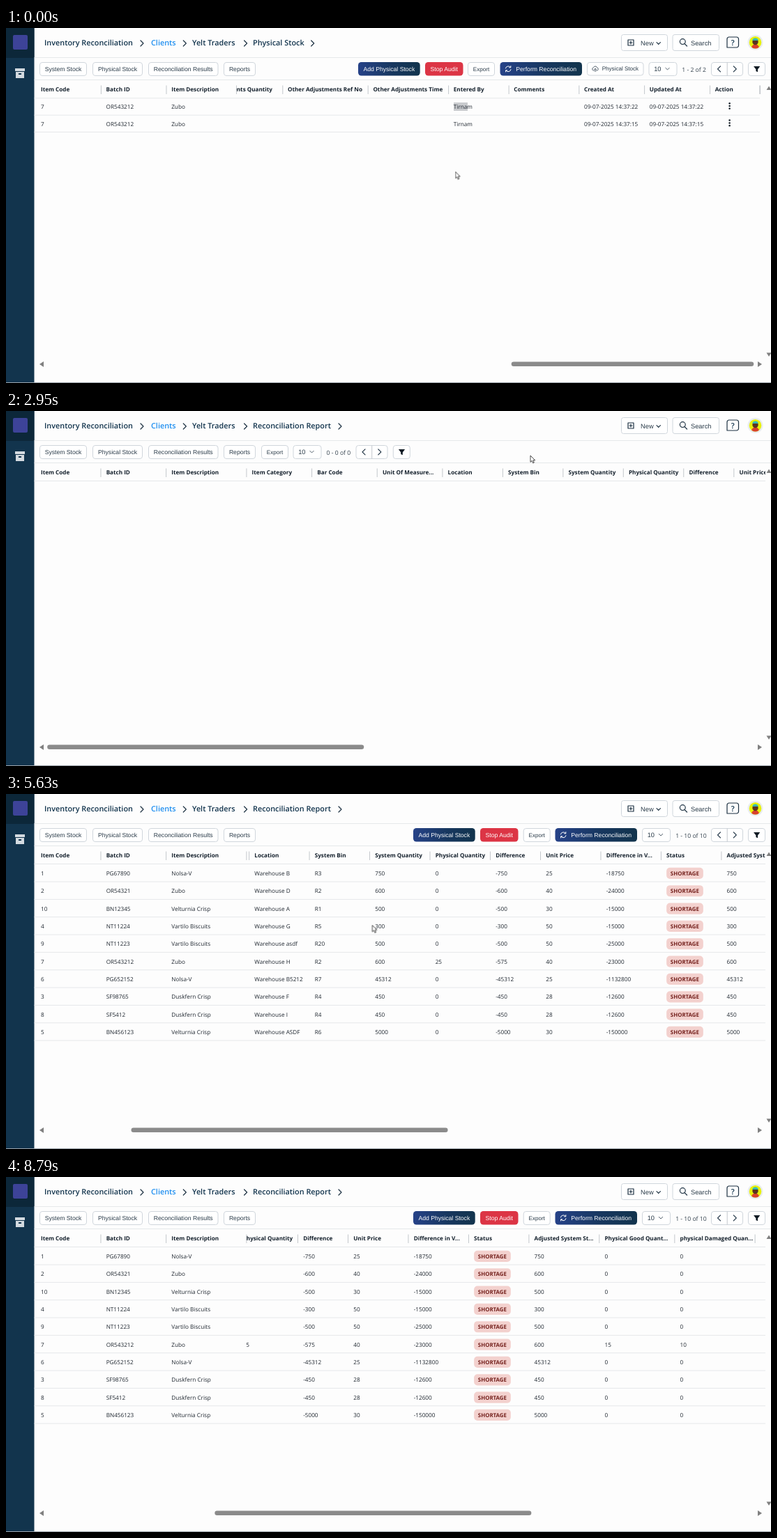
An HTML page that plays this animation: 1097 px wide and 510 px high, repeating every 8950 ms.

```html
<!DOCTYPE html>
<html lang="en">
<head>
<meta charset="utf-8">
<title>Inventory Reconciliation</title>
<style>
@property --s { syntax: "<number>"; inherits: true; initial-value: 0; }
html, body { margin: 0; width: 100%; height: 100%; overflow: hidden; background: #fdfdfd; }
svg { display: block; width: 1097px; height: 510px; }
text { font: 8.2px "Open Sans", "Noto Sans", sans-serif; fill: #1f2730; text-rendering: geometricPrecision; white-space: pre; }
.head { font-size: 8.15px; font-weight: 700; fill: #14202c; }
.crumb { font-size: 10.85px; font-weight: 600; fill: #12344d; }
.link { fill: #1f8ff0; }
.btn { font: 8.64px "Liberation Sans", Arial, sans-serif; fill: #2a3b49; }
.small { font-size: 8.07px; }
.large { font-size: 9.3px; }
.white { fill: #fff; }
.count { font-size: 8.6px; fill: #33414d; }
.badge { font-size: 7.85px; font-weight: 700; fill: #74201c; }
.mid { text-anchor: middle; }
.end { text-anchor: end; }
.box { fill: #fff; stroke: #d0d6dc; }
.navy { fill: url(#navy); }
.red { fill: #dc3545; }
.pill { fill: #f3d1ce; }
.line { fill: #e6e8ea; }
.sep { fill: #c4c8cc; }
.bar { fill: #8b8b8b; }
.ico { fill: none; stroke: #1d3142; stroke-width: 1.2; stroke-linecap: round; stroke-linejoin: round; }
.thin { stroke: #55626e; stroke-width: 1; }
.pale { stroke: #fff; stroke-width: 1; }

.stock, .blankless, .waiting, .loaded, .report, .lift, .sel, .seltext, .load, .cursor, .view {
  animation: 8950ms infinite step-end;
}
.stock { animation-name: stock; }
.report { animation-name: report; }
.blankless { animation-name: crumbs; }
.waiting { animation-name: waiting; }
.loaded { animation-name: loaded; }
.sel { fill: #c9cbce; animation-name: sel; }
.seltext { animation-name: seltext; }
.lift { animation-name: lift; animation-timing-function: ease; }
.load { fill: #12304a; animation-name: load; animation-timing-function: ease; }
.cursor { animation-name: move; animation-timing-function: ease-in-out; }
.view { animation-name: scroll; }
.slide { transform: translateX(calc(var(--s) * -1px)); }
.thumb { transform: translateX(calc(var(--s) * .434px)); }

@keyframes stock { 0% { visibility: visible } 28.827%, 100% { visibility: hidden } }
@keyframes crumbs { 0% { visibility: hidden } 28.827%, 100% { visibility: visible } }
@keyframes report { 0% { visibility: hidden } 31.955%, 100% { visibility: visible } }
@keyframes waiting { 0% { visibility: hidden } 31.955% { visibility: visible } 35.866%, 100% { visibility: hidden } }
@keyframes loaded { 0% { visibility: hidden } 35.866%, 100% { visibility: visible } }
@keyframes sel { 0% { fill: #c9cbce } 16.648%, 100% { fill: #2c66cc } }
@keyframes seltext { 0% { fill: #1f2730 } 16.648%, 100% { fill: #fff } }
@keyframes lift {
  0%, 12.8% { transform: none; filter: drop-shadow(0 0 0 rgba(40,62,140,0)) }
  14.749%, 100% { transform: translateY(-.8px); filter: drop-shadow(0 3px 3.5px rgba(40,62,140,.55)) }
}
@keyframes load {
  0%, 18.771% { transform: scaleX(0); opacity: 1 }
  21.006%, 22.01% { transform: scaleX(.0875) }
  24% { transform: scaleX(.18) }
  25.9% { transform: scaleX(.3) }
  28.268% { transform: scaleX(1) }
  28.827% { transform: scaleX(1); opacity: 1 }
  29.944%, 100% { transform: scaleX(1); opacity: 0 }
}
@keyframes move {
  0%, 4.693% { transform: translate(644.5px, 206.5px) }
  14.413%, 34.86% { transform: translate(752px, 64px) }
  44.469%, 45.81% { transform: translate(628px, 86px) }
  51.061%, 52.849% { transform: translate(203px, 121px) }
  55.084%, 70.056% { transform: translate(525.3px, 188.5px) }
  77.318%, 78.659% { transform: translate(273px, 250px) }
  81.788%, 85.251% { transform: translate(716px, 341px) }
  92.291%, 100% { transform: translate(1059px, 512px) }
}
@keyframes scroll {
  0% { --s: 0 }
  58.101% { --s: 57.3 }
  58.436% { --s: 74 }
  59.5% { --s: 118 }
  60.6% { --s: 170 }
  61.8% { --s: 226 }
  62.905% { --s: 277.3 }
  63.799% { --s: 336 }
  64.7% { --s: 396 }
  65.6% { --s: 450 }
  66.5% { --s: 495 }
  67.374% { --s: 526 }
  68.156% { --s: 543 }
  69.162% { --s: 551 }
  71.5% { --s: 552.4 }
  74%, 100% { --s: 553.3 }
}
</style>
</head>
<body>
<svg id="stage" viewBox="0 0 1097 510" xmlns="http://www.w3.org/2000/svg"></svg>
<script>
const text = (x, y, s, cls = '') => `<text x="${x}" y="${y}" class="${cls}">${s}</text>`;
const rect = (x, y, w, h, cls, rx = 0) => `<rect x="${x}" y="${y}" width="${w}" height="${h}" rx="${rx}" class="${cls}"/>`;
const path = (d, cls = 'ico', x = 0, y = 0) => `<path d="${d}" class="${cls}" transform="translate(${x} ${y})"/>`;
const group = (cls, ...parts) => `<g class="${cls}">${parts.join('')}</g>`;
const clip = (id, ...parts) => `<g clip-path="url(#${id})">${parts.join('')}</g>`;

const right = 'M-2 -4L2 0L-2 4', left = 'M2 -4L-2 0L2 4', down = 'M-2.7 -1.3L0 1.4L2.7 -1.3';
const sync = 'M-3.8 -.8A3.9 3.9 0 0 1 3 -2.5M3.6 -4.2V-2H1.4M3.8 .8A3.9 3.9 0 0 1 -3 2.5M-3.6 4.2V2H-1.4';
const cloud = 'M-1.5 2.5H-2.4A2.2 2.2 0 0 1 -2.6 -1.8A2.8 2.8 0 0 1 2.7 -1.6A2.1 2.1 0 0 1 2.5 2.5H1.5M0 4V-.3M-1.4 1L0 -.4L1.4 1';
const funnel = 'M-4.6 -4H4.6L1.3 .4V4.3L-1.3 3.1V.4Z';

const outline = (x, w, label, cls = '') =>
  rect(x + .5, 49.5, w - 1, 19, 'box', 3.5) + text(x + w / 2, 61.6, label, 'btn mid ' + cls);
const solid = (x, w, label, fill) =>
  rect(x, 49, w, 19.5, fill, 4.5) + text(x + w / 2, 61.7, label, 'btn mid white');
const perform = x =>
  rect(x, 49, 117.5, 19.5, 'navy', 4.5) + path(sync, 'ico pale', x + 11.7, 58.8) +
  text(x + 22.8, 61.6, 'Perform Reconciliation', 'btn white');

function pager(select, count, arrows, filter, label) {
  return rect(select + .5, 49.5, 40, 19, 'box', 3.5) + text(select + 7.7, 61.9, '10', 'btn large') +
    path(down, 'ico thin', select + 27, 58.6) + text(count, 62.5, label, 'count') +
    rect(arrows + .5, 49.5, 45, 19, 'box', 3.5) + rect(arrows + 22.7, 49.5, 1, 19, 'sep') +
    path(left, 'ico', arrows + 11.5, 58.8) + path(right, 'ico', arrows + 34.3, 58.8) +
    rect(filter + .5, 49.5, 24, 19, 'box', 3.5) + `<path d="${funnel}" fill="#111b24" transform="translate(${filter + 12.7} 59)"/>`;
}

const actions = (x, exportX) =>
  solid(x, 88.7, 'Add Physical Stock', 'navy') + solid(x + 96, 54.5, 'Stop Audit', 'red') +
  outline(exportX, 39, 'Export', 'small');

const headSep = x => rect(x, 82.5, 1, 12.5, 'sep');
const heading = (x, s) => text(x, 91.1, s, 'head');
const crumbArrow = x => path('M-2 -4L2 0L-2 4', 'ico', x, 22);

function scrollbar(x, w, cls = '') {
  return group(cls, rect(x, 479.4, w, 6.6, 'bar', 3.3));
}

function frame() {
  return rect(0, 0, 1097, 2, 'load', 1) +
    '<rect width="40.5" height="510" fill="#12344d"/><rect width="40.5" height="43" fill="#0c2739"/>' +
    '<rect x="10" y="10" width="21" height="21" rx="2" fill="#3d4398"/>' +
    '<path d="M13 58H27V62H13ZM14 63H26V72H14ZM18 65V67H22V65Z" fill="#d3dae0" fill-rule="evenodd"/>' +
    rect(40.5, 42, 1057, 1, 'line') + rect(40.5, 74, 1057, 1, 'line') +
    text(55, 24.7, 'Inventory Reconciliation', 'crumb') + text(208, 24.7, 'Clients', 'crumb link') +
    text(267, 24.7, 'Yelt Traders', 'crumb') + [195, 256.3, 343.6].map(crumbArrow).join('') +
    rect(882.5, 9.5, 66, 23, 'box', 3) + path('M-4 -4H4V4H-4ZM0 -2V2M-2 0H2', 'ico', 896, 21) +
    text(910, 24.5, 'New', 'btn large') + path(down, 'ico', 935.7, 22) +
    rect(956, 9.5, 66.5, 23, 'box', 3) +
    '<circle cx="970.3" cy="19.6" r="3.9" class="ico"/>' + path('M973.2 22.6L976.5 26') +
    text(982, 24.6, 'Search', 'btn large') +
    path('M1036.5 13H1047.5A3 3 0 0 1 1050.5 16V25A3 3 0 0 1 1047.5 28H1034V16A3 3 0 0 1 1036.5 13Z') +
    text(1042.2, 24.6, '?', 'crumb mid') + avatar() +
    outline(48, 68, 'System Stock') + outline(124, 72, 'Physical Stock') +
    outline(204, 100.5, 'Reconciliation Results') + outline(312, 46, 'Reports');
}

function avatar() {
  return '<circle cx="1074.5" cy="20.7" r="11" fill="#e9edf0"/><circle cx="1074.5" cy="20.7" r="8.8" fill="#e9f20a"/>' +
    '<path d="M1069.3 27.7A5.2 4.2 0 0 1 1079.7 27.7A8.8 8.8 0 0 1 1069.3 27.7Z" fill="#d8402c"/>' +
    '<circle cx="1074.5" cy="20" r="4.2" fill="#5a3420"/>' +
    '<path d="M1070.2 18A4.4 4.4 0 0 1 1078.8 18Z" fill="#35b9b4"/>';
}

function arrows() {
  return '<path d="M54 479V487L48 483ZM1078 479V487L1084 483ZM1090.5 89H1097.5L1094 83.5ZM1090.5 466.5H1097.5L1094 472Z" fill="#808080"/>';
}

function stock() {
  const heads = [[50, 'Item Code'], [143.6, 'Batch ID'], [237.2, 'Item Description'], [404, 'Other Adjustments Ref No'],
    [526.4, 'Other Adjustments Time'], [641.8, 'Entered By'], [728.3, 'Comments'], [829, 'Created At'],
    [922.8, 'Updated At'], [1016.7, 'Action']];
  const row = (y, time, name) =>
    [[50, '7'], [143.6, 'OR543212'], [237.2, 'Zubo'], [641.8, name], [829, time], [922.8, time]]
      .map(([x, s]) => text(x, y + 3.1, s)).join('') +
    [-4.8, -1, 2.8].map(d => `<circle cx="1037.6" cy="${y + d}" r="1.25" fill="#111b24"/>`).join('');
  return group('stock',
    text(354, 24.7, 'Physical Stock', 'crumb'), crumbArrow(439.7),
    actions(505, 662), group('lift', perform(708.5)),
    rect(833.5, 49.5, 80.5, 18.5, 'box', 3.5), path(cloud, 'ico thin', 845, 58.6), text(854.7, 61.4, 'Physical Stock', 'btn small'),
    pager(921.5, 969.3, 1011, 1064, '1 - 2 of 2'),
    heads.map(([x, s]) => heading(x, s) + (x > 50 ? headSep(x - 7.7) : '')).join(''),
    headSep(330), clip('stockClip', text(382, 91.1, 'Other Adjustments Quantity', 'head end')),
    rect(1080.3, 82.5, 1.7, 12.5, 'sep'),
    [100.3, 124.7, 149].map(y => rect(40.5, y, 1040.5, 1, 'line')).join(''),
    rect(642, 107, 20, 12, 'sel'),
    row(113, '09-07-2025 14:37:22', '<tspan class="seltext">Tirna</tspan>m'),
    row(137.4, '09-07-2025 14:37:15', 'Tirnam'),
    scrollbar(724.7, 347.5), arrows());
}

// code, batch, item, bar code, location, bin, system, physical, price
const items = [
  [1, 'PG67890', 'Nolsa-V', '8901719101038', 'B', 'R3', 750, 0, 25],
  [2, 'OR54321', 'Zubo', '8901719112744', 'D', 'R2', 600, 0, 40],
  [10, 'BN12345', 'Velturnia Crisp', '21.0', 'A', 'R1', 500, 0, 30],
  [4, 'NT11224', 'Vartilo Biscuits', '23.0', 'G', 'R5', 300, 0, 50],
  [9, 'NT11223', 'Vartilo Biscuits', '28.0', 'asdf', 'R20', 500, 0, 50],
  [7, 'OR543212', 'Zubo', '26.0', 'H', 'R2', 600, 25, 40],
  [6, 'PG652152', 'Nolsa-V', '8901719101038', 'B5212', 'R7', 45312, 0, 25],
  [3, 'SF98765', 'Duskfern Crisp', '22.0', 'F', 'R4', 450, 0, 28],
  [8, 'SF5412', 'Duskfern Crisp', '27.0', 'I', 'R4', 450, 0, 28],
  [5, 'BN456123', 'Velturnia Crisp', '24.0', 'ASDF', 'R6', 5000, 0, 30]
];
const columns = [
  ['Item Code', 130, r => r[0]],
  ['Batch ID', 130, r => r[1]],
  ['Item Description', 160, r => r[2]],
  ['Item Category', 130, () => 'Biscuits'],
  ['Bar Code', 130, r => r[3]],
  ['Unit Of Measure...', 130, () => 'Pack'],
  ['Location', 120, r => 'Warehouse ' + r[4]],
  ['System Bin', 120, r => r[5]],
  ['System Quantity', 120, r => r[6]],
  ['Physical Quantity', 120, r => r[7]],
  ['Difference', 100, r => r[7] - r[6]],
  ['Unit Price', 120, r => r[8]],
  ['Difference in V...', 120, r => (r[7] - r[6]) * r[8]],
  ['Status', 120, () => 'SHORTAGE'],
  ['Adjusted System St...', 140, r => r[6]],
  ['Physical Good Quant...', 150, r => r[7] && 15],
  ['physical Damaged Quan...', 160, r => r[7] && 10]
];

function report() {
  const pitch = 25.34, rowY = i => 114 + i * pitch;
  let x = 50;
  const parts = columns.map(([label, units, value]) => {
    const at = +x.toFixed(2);
    x += units * .7205;
    const cells = items.map((item, i) => label === 'Status'
      ? rect(at, rowY(i) - 8.2, 52.7, 16.2, 'pill', 5) + text(at + 26.3, rowY(i) + 2.9, value(item), 'badge mid')
      : text(at, rowY(i) + 3.1, value(item)));
    return heading(at, label) + headSep(x - 8.2) + group('loaded', ...cells);
  });
  const rules = items.map((_, i) => rect(40.5, 100.2 + (i + 1) * pitch, 1048.5, 1, 'line'));
  return group('blankless', text(354, 24.7, 'Reconciliation Report', 'crumb'), crumbArrow(479)) +
    group('waiting', outline(366, 39, 'Export', 'small'), pager(411.5, 459.6, 501.5, 554.8, '0 - 0 of 0')) +
    group('loaded', actions(584, 741.7), perform(787.5), pager(912, 960.2, 1011, 1064, '1 - 10 of 10'), ...rules) +
    group('report', rect(40.5, 100, 1048.5, 1, 'line'), ...parts.slice(0, 3),
      group('view', clip('reportClip', group('slide', ...parts.slice(3))), scrollbar(59.2, 454, 'thumb')), arrows());
}

document.getElementById('stage').innerHTML =
  `<defs>
    <linearGradient id="navy"><stop offset="0" stop-color="#264288"/><stop offset=".55" stop-color="#17375f"/><stop offset="1" stop-color="#12344d"/></linearGradient>
    <clipPath id="stockClip"><rect x="330.5" y="75" width="66" height="26"/></clipPath>
    <clipPath id="reportClip"><rect x="345" y="75" width="744" height="400"/></clipPath>
  </defs>` + frame() + stock() + report() +
  '<rect y="509" width="1097" height="1" fill="#9aa3aa"/>' +
  group('cursor', '<path d="M0 0V9.4L2.2 7.4L3.7 10.8L5.3 10.1L3.9 6.8H6.7Z" fill="#fff" stroke="#1c1c1c" stroke-width=".8" stroke-linejoin="round"/>');
</script>
</body>
</html>
```
